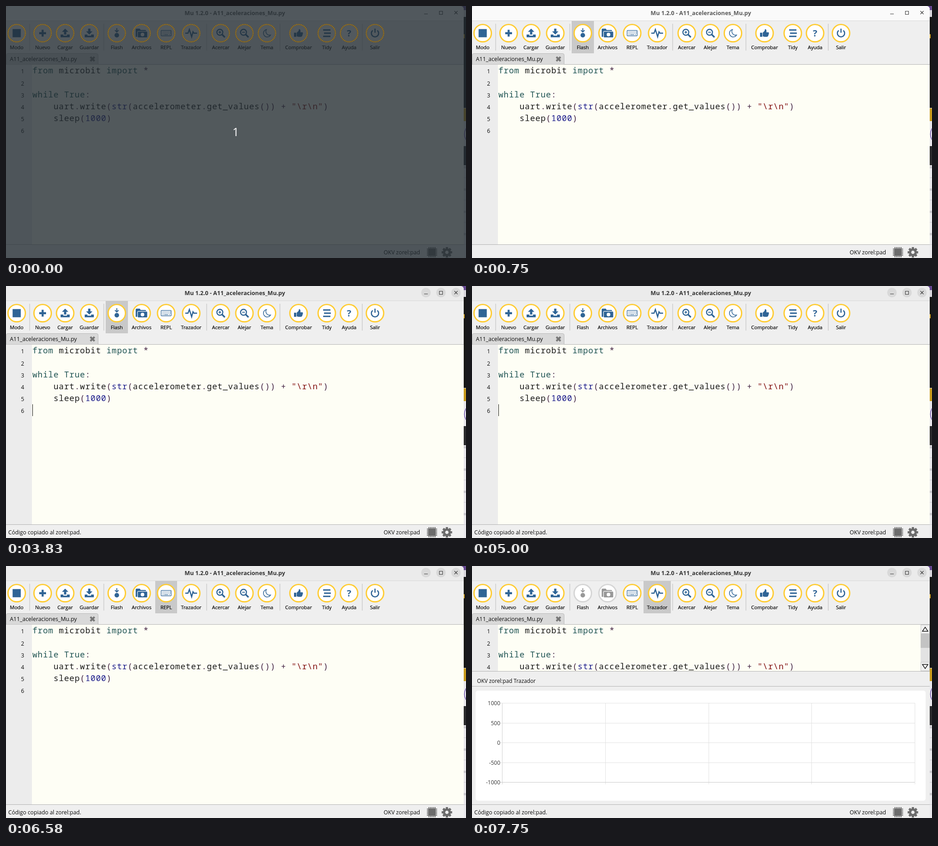
These frames come from a looping animation (1011x554 px, 8 s). An HTML page:

```html
<!DOCTYPE html>
<html lang="es">
<head>
<meta charset="utf-8">
<title>Editor</title>
<style>
  html, body { margin: 0; width: 100%; height: 100%; overflow: hidden; background: #efefef; }
  svg { display: block; width: 1011px; height: 554px; }
  text { font: 500 12.2px "Open Sans", "Noto Sans", sans-serif; fill: #0a0a0a; white-space: pre; }
  .label { font-size: 11px; fill: #000; stroke: #000; stroke-width: .2px; text-anchor: middle; }
  .title { font-size: 12.6px; font-weight: 700; text-anchor: middle; }
  .code { font: 18px "Noto Sans Mono", "DejaVu Sans Mono", monospace; letter-spacing: .82px; fill: #1c1c1c; }
  .end { text-anchor: end; }
  .kw { fill: #205454; }
  .op { fill: #432443; }
  .num { fill: #1c1c8b; }
  .str { fill: #800c0c; }
  .line { fill: none; stroke: currentColor; }
  .crisp { shape-rendering: crispEdges; }
</style>
</head>
<body>
<svg id="stage" viewBox="0 0 1011 554" xmlns="http://www.w3.org/2000/svg">
  <g id="desktop" class="crisp">
    <rect width="1011" height="554" fill="#e9e8ec"/>
    <rect x="990" width="21" height="9" fill="#65478f"/>
    <rect x="1006" y="9" width="5" height="15" fill="#d8d6dc"/>
    <rect x="1006" y="24" width="5" height="200" fill="#171717"/>
    <rect x="1006" y="62" width="2" height="9" fill="#d9a520"/>
    <rect x="1006" y="225" width="5" height="28" fill="#c79a1c"/>
    <rect x="1006" y="308" width="5" height="42" fill="#2b2b2d"/>
  </g>
  <path d="M1011 269Q1004 282 1011 294" fill="none" stroke="#6b4fa8" stroke-width="1.5"/>
  <path d="M0 554V8Q0 0 8 0H998Q1006 0 1006 8V554Z" fill="#efefef"/>
  <path id="titlebar" d="M0 33V8Q0 0 8 0H998Q1006 0 1006 8V33Z"/>
  <g class="crisp">
    <rect y="32" width="1006" height="1" fill="#d8d8d8"/>
    <rect y="128" width="1006" height="1" fill="#b4b4b4"/>
    <rect y="129" width="57" height="395" fill="#ececec"/>
    <rect x="57" y="129" width="949" height="395" fill="#fefef5"/>
    <rect y="524" width="1006" height="1" fill="#b2b2b2"/>
  </g>
  <text id="title" class="title" x="503" y="19.5">Mu 1.2.0 - A11_aceleraciones_Mu.py</text>
  <g id="discs" fill="#d9d9d9">
    <circle cx="923" cy="14.5" r="10.5"/><circle cx="956" cy="14.5" r="10.5"/><circle cx="989" cy="14.5" r="10.5"/>
  </g>
  <path d="M919 17.5h8M952.5 11.5h7v7h-7zM985.5 11l7 7m0-7l-7 7" fill="none" stroke="#3c3c3c" stroke-width="1.1"/>

  <rect id="hover" y="33" height="71" fill="#c9c9c9" class="crisp"/>
  <path d="M52 39v59M215 39v59M441 39v59M602 39v59M783 39v59" stroke="#bababa" stroke-width="1"/>
  <g id="toolbar"></g>

  <path d="M.5 128.5V108Q.5 104.5 4 104.5H199Q202.5 104.5 202.5 108V128.5" fill="#d9d9d9" stroke="#b9b9b9"/>
  <text x="8.5" y="121" style="font-size:12.4px">A11_aceleraciones_Mu.py</text>
  <path d="M185.500 112l9 9m0-9l-9 9" stroke="#777" stroke-width="4"/>

  <g id="code"></g>
  <rect id="caret" x="58" y="260" width="1" height="26" fill="#111" class="crisp"/>

  <g id="plot">
    <g class="crisp">
      <rect y="231" width="1006" height="293" fill="#efefef"/>
      <rect y="231" width="1006" height="1" fill="#b2b2b2"/>
      <rect y="264" width="1006" height="1" fill="#b2b2b2"/>
      <rect x="986" y="129" width="20" height="102" fill="#e3e3e3"/>
      <rect x="986" y="149" width="20" height="31" fill="#c3c3c3"/>
    </g>
    <path d="M986.5 129.5h19v19h-19zM986.5 211.5h19v19h-19z" fill="#f0f0f0" stroke="#c8c8c8"/>
    <path d="M990 143.500l6-9 6 9zM990 216.500l6 9 6-9z" fill="#fff" stroke="#111" stroke-width="1.4"/>
    <text x="11" y="257" style="font-size:11.8px">OKV zorel:pad Trazador</text>
    <rect x="8" y="274" width="989" height="242" rx="5" fill="#fff"/>
    <g id="grid" class="crisp"></g>
  </g>

  <text id="status" x="5" y="546">Código copiado al zorel:pad.</text>
  <text class="end" x="910" y="546">OKV zorel:pad</text>
  <g id="chip" fill="#6c6c6c" stroke="#6c6c6c"></g>
  <g id="gear" transform="translate(969 541.5)" fill="none" stroke="#6c6c6c"></g>

  <g id="countdown">
    <rect width="1011" height="554" fill="#222b31" opacity=".78"/>
    <g id="glow" fill="none" stroke="#94702a" stroke-width="2.4" stroke-dasharray="2.5 1"></g>
    <text x="505" y="286" text-anchor="middle" style="font-size:25px;fill:#fff">1</text>
  </g>
</svg>
<script>
const $ = id => document.getElementById(id);
const LOOP = 8000;
const BLUE = '#2f6496', GOLD = '#ffcc33';
const RING_Y = 59.7;

const stroke = (d, w) => `<path class="line" d="${d}" stroke-width="${w}"/>`;
const solid = d => `<path fill="currentColor" d="${d}"/>`;
const dot = (x, y, r, fill = 'currentColor') => `<circle cx="${x}" cy="${y}" r="${r}" fill="${fill}"/>`;
const tray = solid('M-10 3H-4V5.500H4V3H10V9H-10Z');
const lens = '<circle class="line" cx="-2" cy="-2" r="6.500" stroke-width="2.400"/>' + stroke('M3 3L9 9', 3.4);
const folder = solid('M-13 8V-8Q-13-10-11-10H-4L-2-7H8Q10-7 10-5V8Z') +
  '<rect x="-9" y="-4" width="22" height="14" rx="2" fill="currentColor" stroke="#fff" stroke-width="1.2"/>' +
  dot(2, 3, 4, '#fff');

function keyboard() {
  let keys = '';
  for (const y of [-3, 0]) for (let x = -8; x <= 8; x += 3.2) keys += `M${x} ${y}h1.500`;
  return '<rect class="line" x="-11" y="-6" width="22" height="12" rx="1" stroke-width="1.300"/>' +
    stroke(keys + 'M-8 3.200h2M-4.500 3.200h9M6.500 3.200h2', 1.2);
}

// name, centre x, icon
const tools = [
  ['Modo', 23.5, solid('M-9-9H9V9H-9Z')],
  ['Nuevo', 80.5, stroke('M-7.500 0H7.500M0-7.500V7.500', 4.4)],
  ['Cargar', 130, tray + solid('M0-10L7-3H2.500V3H-2.500V-3H-7Z')],
  ['Guardar', 183, tray + solid('M0 3L-7-4H-2.500V-10H2.500V-4H7Z')],
  ['Flash', 243.5, stroke('M0-11V-3M-4-6.500L0-2.500L4-6.500', 2) + dot(0, 4.5, 5)],
  ['Archivos', 298, folder],
  ['REPL', 352, keyboard()],
  ['Trazador', 407, stroke('M-13 0H-7L-4-8L1 8L4-3L6 0H13', 2.5)],
  ['Acercar', 472, lens + stroke('M-5-2H1M-2-5V1', 1.8)],
  ['Alejar', 524, lens + stroke('M-5-2H1', 1.8)],
  ['Tema', 573.5, stroke('M-1-8A8.300 8.300 0 1 0 8 4A8 8 0 0 1-1-8Z', 1.5)],
  ['Comprobar', 643, solid('M-10-1H-5V8H-10Z') +
    solid('M-4-1L0-5L1-9Q5-9 4-2H8Q10-2 9.500 1L8 6Q7 8 5 8H0L-4 7Z')],
  ['Tidy', 705, stroke('M-8-7H8M-6 0H9M-8 7H8', 3)],
  ['Ayuda', 754, '<text y="7" text-anchor="middle" style="font-size:20px;font-weight:700;fill:currentColor">?</text>'],
  ['Salir', 811, stroke('M-5-6A8 8 0 1 0 5-6M0-10V-1', 2.6)]
];

$('toolbar').innerHTML = tools.map(([name, x, icon]) =>
  `<g id="${name}" transform="translate(${x} ${RING_Y})" color="${BLUE}">
    <circle class="ring" r="19.100" fill="#fff" stroke="${GOLD}" stroke-width="2.900"/>${icon}
    <text class="label" y="35.300">${name}</text></g>`).join('');
$('glow').innerHTML = tools.map(([, x]) => `<circle cx="${x}" cy="${RING_Y}" r="19.100"/>`).join('');

// '|' separates runs, the first letter picks the colour
const kinds = { k: 'kw', o: 'op', n: 'num', s: 'str', i: '' };
const lines = [
  'kfrom |imicrobit |kimport |o*',
  '',
  'kwhile |kTrue|o:',
  'i    uart|o.|iwrite|o(|nstr|o(|iaccelerometer|o.|iget_values|o()) + |s"\\r\\n"|o)',
  'i    sleep|o(|n1000|o)',
  ''
];
$('code').innerHTML = lines.map((line, i) => {
  const y = 148.4 + 26.2 * i;
  const runs = line.split('|').map(r => `<tspan class="${kinds[r[0]] || ''}">${r.slice(1)}</tspan>`).join('');
  return `<text class="end" x="40" y="${y}">${i + 1}</text><text class="code" x="58" y="${y}">${runs}</text>`;
}).join('');

function drawGrid() {
  let out = '';
  for (let i = 0; i < 5; i++) {
    const x = Math.round(66 + 226.75 * i), y = Math.round(301 + 43.6 * i);
    out += `<rect x="${x}" y="301" width="1" height="179" fill="${i ? '#e2e2e2' : '#d0d0d0'}"/>
      <rect x="62" y="${y}" width="911" height="1" fill="${i < 4 ? '#e2e2e2' : '#c8c8c8'}"/>
      <text class="end" x="62" y="${y + 5}" style="font-size:12px;fill:#383838">${1000 - 500 * i}</text>`;
  }
  $('grid').innerHTML = out;
}

function drawChip() {
  let pins = '';
  for (let i = 0; i < 5; i++) {
    const d = 3.4 * i;
    pins += `M${929.5 + d} 530v22.500M925 ${534.5 + d}h22.500`;
  }
  $('chip').innerHTML = `<path d="${pins}" stroke-width="1.900"/><rect x="928.500" y="533.500" width="15.500" height="15.500" stroke="none"/>`;
}

function drawGear() {
  let out = '<circle r="6.200" stroke-width="5"/>';
  for (let a = 0; a < 360; a += 45) out += `<path d="M0-7V-11.500" stroke-width="5" transform="rotate(${a})"/>`;
  $('gear').innerHTML = out;
}

function drawShelf() {
  let out = '';
  for (let i = 0; i < 8; i++)
    out += `<rect x="1006" y="${352 + 24.5 * i}" width="5" height="${i % 2 ? 1 : 5}" fill="#c9c8cd"/>`;
  $('desktop').innerHTML += out;
}

drawGrid();
drawChip();
drawGear();
drawShelf();

// [start ms, value], the last entry reached holds
const hovers = [[0, ''], [580, 'REPL'], [660, 'Archivos'], [750, 'Flash'], [5000, ''],
  [6580, 'REPL'], [7000, 'Trazador'], [7080, 'Acercar'], [7170, 'Trazador']];
const carets = [[0, 0], [2330, 1], [3920, 0], [4500, 1], [5080, 0], [5670, 1], [6250, 0], [7000, 1], [7500, 0]];
const spans = { Flash: [219, 268], Archivos: [269, 327], REPL: [328, 376], Trazador: [377, 437], Acercar: [445, 499] };

const at = (track, t) => track.filter(([start]) => start <= t).pop()[1];
const show = (id, on) => $(id).setAttribute('display', on ? 'inline' : 'none');

function render(t) {
  const focused = t >= 2330, plotting = t >= 7750;
  const span = spans[at(hovers, t)];
  show('countdown', t < 80);
  show('discs', focused);
  $('titlebar').setAttribute('fill', focused ? '#ebebeb' : '#fafafa');
  $('title').style.fill = focused ? '#333' : '#5b5b5b';
  show('hover', span);
  if (span) {
    $('hover').setAttribute('x', span[0]);
    $('hover').setAttribute('width', span[1] - span[0]);
  }
  show('caret', at(carets, t));
  show('status', t >= 3830);
  show('plot', plotting);
  for (const id of ['Flash', 'Archivos']) {
    $(id).setAttribute('color', plotting ? '#989898' : BLUE);
    $(id).querySelector('.ring').setAttribute('stroke', plotting ? '#d5d5d5' : GOLD);
  }
}

const begin = performance.now();
function tick() {
  render((performance.now() - begin) % LOOP);
  requestAnimationFrame(tick);
}
tick();
</script>
</body>
</html>
```
